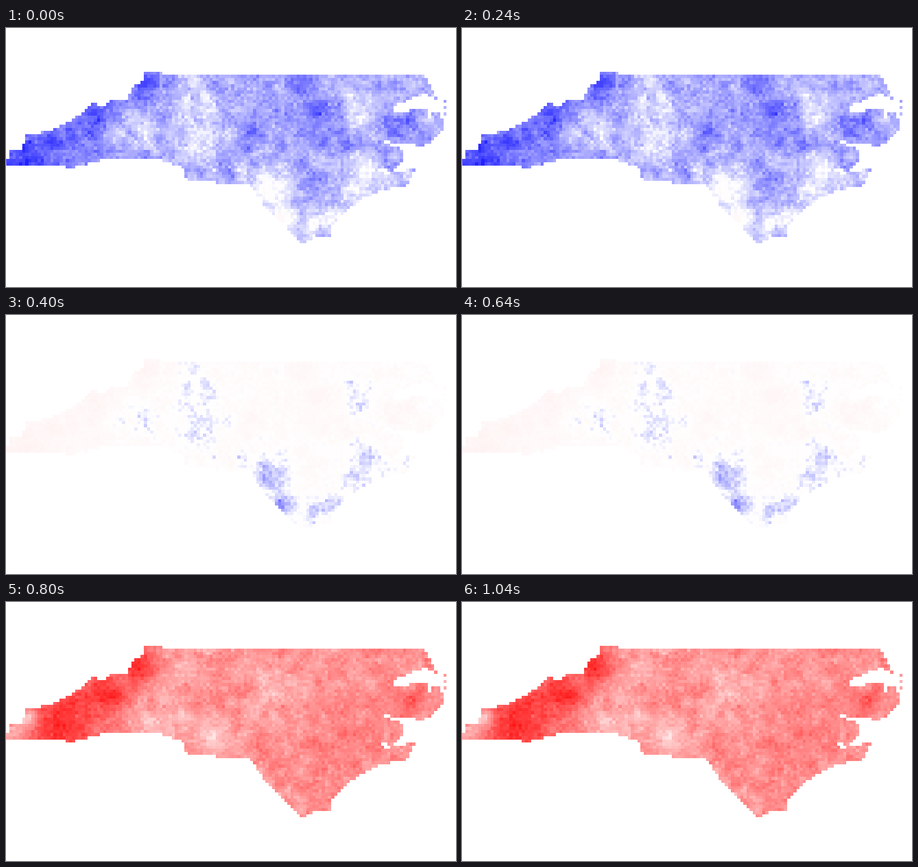
Write a matplotlib script that moves like this. It is 800 px wide and 461 px high and loops after 1.2 s.

```python
import numpy as np
import matplotlib.pyplot as plt
from matplotlib.animation import FuncAnimation
from matplotlib.path import Path

WIDTH, HEIGHT = 800, 461
CELL = 5.55
COLS, ROWS = 146, 84
LEFT, TOP = 0.8 - CELL, 0.6

rng = np.random.default_rng(11)
X, Y = np.meshgrid(LEFT + (np.arange(COLS) + 0.5) * CELL,
                   TOP + (np.arange(ROWS) + 0.5) * CELL)

# Corners of the land, clockwise from the western tip
OUTLINE = [
    (-6, 245), (-6, 234), (6, 234), (6, 217), (28, 217), (36, 190), (83, 183),
    (139, 150), (156, 134), (167, 143), (195, 126), (217, 126), (222, 108),
    (245, 95), (245, 78), (278, 78), (278, 84), (745, 84), (756, 108),
    (768, 128), (745, 117), (689, 139), (689, 150), (750, 145), (751, 168),
    (758, 150), (774, 150), (777, 182), (744, 211), (667, 201), (706, 218),
    (706, 239), (684, 256), (667, 250), (672, 261), (728, 250), (711, 281),
    (667, 289), (606, 322), (578, 356), (578, 375), (550, 374), (525, 384),
    (467, 327), (433, 279), (322, 272), (316, 250), (278, 236), (190, 231),
    (110, 250), (100, 245),
]

# Hills and hollows: x, y, radius, height
COOL = [
    (60, 220, 75, 0.40), (10, 235, 25, 0.20), (165, 150, 42, 0.36),
    (248, 100, 28, 0.45), (193, 190, 18, -0.20), (245, 185, 25, -0.15),
    (335, 110, 26, -0.22), (345, 192, 36, -0.28), (437, 185, 38, 0.20),
    (525, 85, 40, 0.22), (560, 175, 50, 0.22), (552, 285, 30, 0.20),
    (470, 290, 36, -0.34), (493, 340, 22, -0.45), (560, 345, 36, -0.22),
    (635, 272, 44, -0.20), (630, 148, 25, -0.22), (700, 172, 32, 0.25),
]
WARM = [
    (100, 215, 60, 0.42), (180, 160, 38, 0.38), (238, 108, 28, 0.42),
    (10, 235, 28, -0.10), (40, 208, 16, -0.30), (270, 200, 40, -0.18),
    (314, 200, 14, -0.14), (365, 240, 36, -0.20), (470, 150, 45, -0.13),
    (315, 115, 26, -0.12), (600, 245, 80, 0.08), (715, 175, 30, 0.18),
]


def land():
    cells = np.c_[X.ravel(), Y.ravel()]
    inside = Path(OUTLINE).contains_points(cells).reshape(X.shape)
    for y in (131, 142, 153):
        inside[int((y - TOP) / CELL), int((780 - LEFT) / CELL)] = True
    return inside


def surface(base, hills):
    return base + sum(h * np.exp(-((X - x) ** 2 + (Y - y) ** 2) / r ** 2)
                      for x, y, r, h in hills)


def grain(rough, patchy):
    """Cell noise plus a softened layer of it."""
    soft = rng.normal(size=X.shape)
    for _ in range(2):
        for axis in (0, 1):
            soft = (np.roll(soft, 1, axis) + soft + np.roll(soft, -1, axis)) / 3
    return rough * rng.normal(size=X.shape) + patchy * soft / soft.std()


def paint(value, tint):
    """Positive values go to blue, negative ones to red."""
    blue = np.clip(value, 0, 1)
    red = np.clip(-value * tint, 0, 1)
    rgb = np.stack([1 - blue, 1 - blue - red, 1 - red], axis=-1)
    rgb[~mask] = 1
    return rgb


mask = land()
cool = surface(0.28, COOL) + grain(0.06, 0.06)
warm = surface(0.42, WARM) + grain(0.04, 0.04)
views = [
    paint(cool, 0.1),
    paint(1.15 * (0.16 - cool), 0.06),
    paint(-np.clip(warm, 0.05, 1), 1),
]

fig = plt.figure(figsize=(WIDTH / 100, HEIGHT / 100), dpi=100, facecolor="white")
ax = fig.add_axes([0, 0, 1, 1])
ax.axis("off")
image = ax.imshow(views[0], interpolation="nearest", aspect="auto",
                  extent=(LEFT, LEFT + COLS * CELL, TOP + ROWS * CELL, TOP))
ax.set_xlim(0, WIDTH)
ax.set_ylim(HEIGHT, 0)


def draw(i):
    image.set_data(views[i])
    return [image]


anim = FuncAnimation(fig, draw, frames=3, interval=400, repeat=True,
                     repeat_delay=0, blit=False)
plt.show()
```
